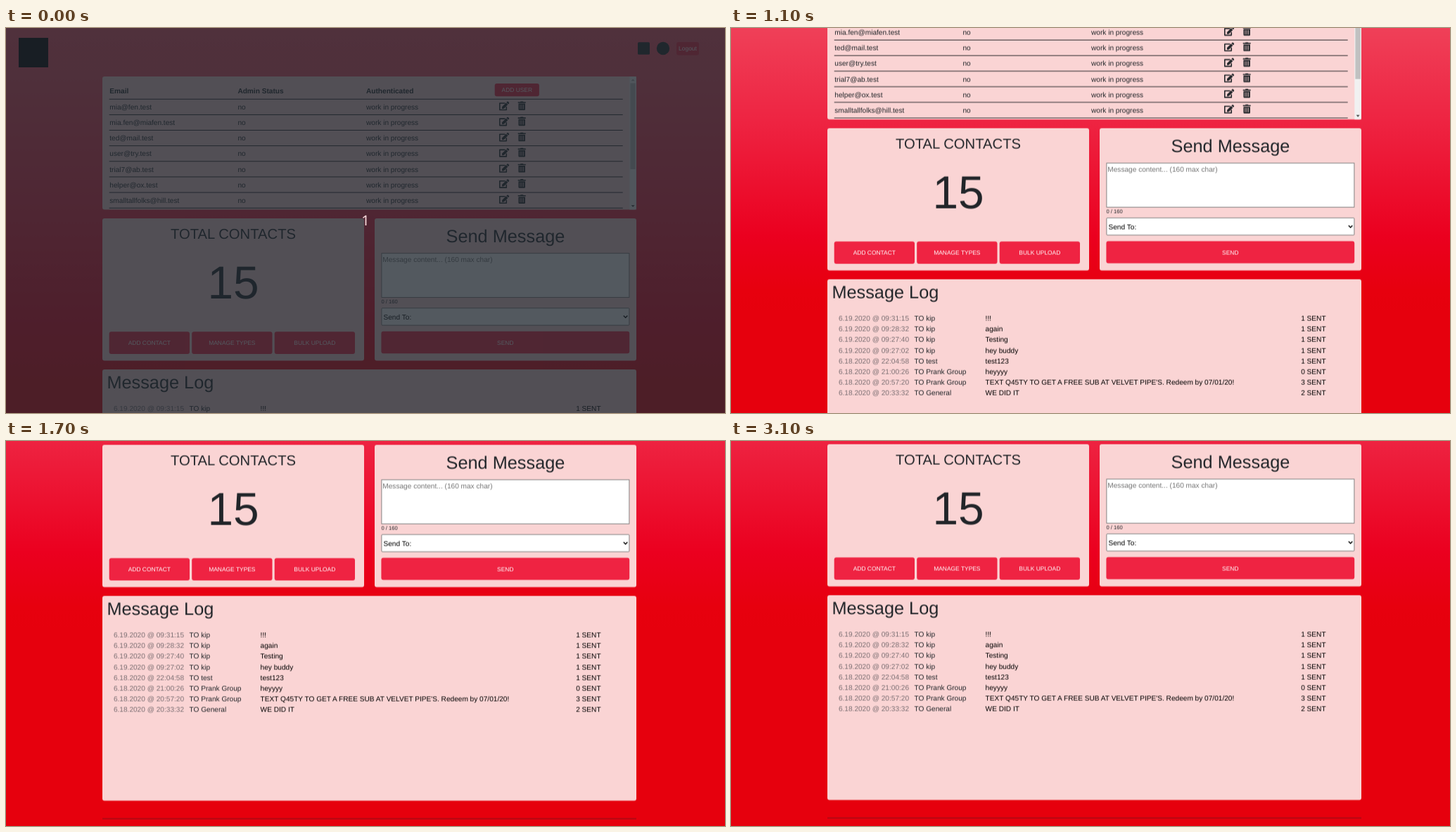
These frames come from a looping animation (1022 by 548 pixels, 3.8 s). An HTML page:

```html
<!DOCTYPE html>
<html lang="en">
<head>
<meta charset="utf-8">
<title>Message dashboard</title>
<style>
  html, body { margin: 0; width: 100%; height: 100%; overflow: hidden; background: #e6000d; }
  svg { display: block; width: 100vw; height: 100vh; }
  text {
    font: 10.12px "Liberation Sans", Arial, sans-serif;
    fill: #212529;
    text-rendering: geometricPrecision;
    white-space: pre;
  }
  .bold { font-weight: 700; }
  .mid { text-anchor: middle; }
  .h1 { font-size: 25.3px; }
  .h2 { font-size: 20.24px; }
  .total { font-size: 65.8px; }
  .label { font-size: 8.43px; fill: #fff; text-anchor: middle; }
  .small { font-size: 7.6px; }
  .hint { fill: #757575; }
  .date { fill: #7a6e72; }
  .black { fill: #000; }
  .card { fill: #fad4d4; }
  .btn { fill: #ef2342; }
  .ink { fill: #212529; }
  .field { fill: #fff; stroke: #767676; stroke-width: .9; }
  .rule { fill: #17191c; }
  .count { font: 20px "Noto Sans", sans-serif; fill: #fbdcde; text-anchor: middle; }

  #page { animation: scroll 3800ms step-end infinite; }
  #shade { animation: lift 3800ms step-end infinite; }

  /* four wheel notches, sampled ten times a second */
  @keyframes scroll {
    0% { transform: translateY(0); }
    15.789% { transform: translateY(-20px); }
    18.421% { transform: translateY(-57px); }
    21.052% { transform: translateY(-66.5px); }
    26.315% { transform: translateY(-94px); }
    28.947% { transform: translateY(-128.4px); }
    31.578% { transform: translateY(-133px); }
    36.842% { transform: translateY(-152px); }
    39.473% { transform: translateY(-186.5px); }
    42.105% { transform: translateY(-243px); }
    44.736% { transform: translateY(-265.5px); }
    52.631%, 100% { transform: translateY(-266.5px); }
  }
  @keyframes lift {
    0% { opacity: 1; }
    13.157%, 100% { opacity: 0; }
  }
</style>
</head>
<body>
<svg viewBox="0 0 1022 548">
  <defs>
    <linearGradient id="sky" gradientUnits="userSpaceOnUse" x1="0" y1="0" x2="0" y2="560">
      <stop offset="0" stop-color="#f15267"/>
      <stop offset=".12" stop-color="#f04d63"/>
      <stop offset=".475" stop-color="#ee2341"/>
      <stop offset=".76" stop-color="#eb001f"/>
      <stop offset=".9" stop-color="#e7000e"/>
      <stop offset="1" stop-color="#e6000d"/>
    </linearGradient>
    <g id="edit" transform="scale(.0247)">
      <path d="M318 96H32V480H416V322" fill="none" stroke="#212529" stroke-width="64" stroke-linejoin="round" stroke-linecap="round"/>
      <path class="ink" d="M396 76L500 180L274 406L160 416L170 302Z"/>
      <path class="ink" d="M420 54L461 11Q488-10 516 11L565 60Q586 88 565 116L522 156Z"/>
    </g>
    <g id="trash" transform="scale(.0247)">
      <path class="ink" d="M32 128H416V464a48 48 0 0 1-48 48H80a48 48 0 0 1-48-48Z"/>
      <path class="ink" d="M10 32H136L152 0H296L312 32H438Q448 32 448 42V96H0V42Q0 32 10 32Z"/>
      <path d="M128 208V432M224 208V432M320 208V432" stroke="#fad4d4" stroke-width="32" stroke-linecap="round"/>
    </g>
  </defs>
  <g id="page"></g>
  <g id="shade">
    <rect width="1022" height="548" fill="rgb(32,40,48)" fill-opacity=".77"/>
    <text class="count" x="511" y="281">1</text>
  </g>
</svg>
<script>
  const rect = (cls, x, y, w, h, r = 0) =>
    `<rect class="${cls}" x="${x}" y="${y}" width="${w}" height="${h}" rx="${r}"/>`;
  const text = (cls, x, y, str) => `<text class="${cls}" x="${x}" y="${y}">${str}</text>`;
  const icon = (id, x, y) => `<use href="#${id}" x="0" y="0" transform="translate(${x} ${y})"/>`;
  const button = (x, y, w, h, str) =>
    rect('btn', x, y, w, h, 3) + text('label', x + w / 2, y + h / 2 + 3.1, str);

  function header() {
    return rect('black', 18, 14, 42, 42) +
      rect('ink', 898, 20.3, 17, 17.4, 1.5) +
      '<circle class="ink" cx="934" cy="29" r="9.2"/>' +
      button(953, 20, 32, 18.7, 'Logout');
  }

  function users() {
    const mails = ['mia@fen.test', 'mia.fen@miafen.test', 'ted@mail.test', 'user@try.test',
      'trial7@ab.test', 'helper@ox.test', 'smalltallfolks@hill.test'];
    const rowH = 22.14;
    let out = rect('card', 137, 69, 759, 189.5, 3) +
      text('bold', 147.3, 93, 'Email') +
      text('bold', 329.4, 93, 'Admin Status') +
      text('bold', 512, 93, 'Authenticated') +
      button(694.7, 79, 63.2, 18.3, 'ADD USER') +
      rect('rule', 146.7, 100.8, 730, .9);
    mails.forEach((mail, i) => {
      const y = 116 + i * rowH;
      out += text('', 147.3, y, mail) +
        text('', 329.4, y, 'no') +
        text('', 512, y, 'work in progress') +
        icon('edit', 701, y - 11.4) +
        icon('trash', 727.7, y - 11.6) +
        rect('rule', 146.7, 100.8 + (i + 1) * rowH, 730, .9);
    });
    return out +
      '<rect x="886.3" y="69" width="9.5" height="189.5" fill="#f1f1f1"/>' +
      '<rect x="887.4" y="78.5" width="7.3" height="122.5" fill="#c1c1c1"/>' +
      '<path d="M888.6 75.3h5l-2.5-2.6z" fill="#a3a3a3"/>' +
      '<path d="M888.6 252.2h5l-2.5 2.6z" fill="#333"/>';
  }

  function contacts() {
    return rect('card', 137, 271, 372, 202.5, 3) +
      text('h2 mid', 323, 300, 'TOTAL CONTACTS') +
      text('total mid', 323, 384.5, '15') +
      ['ADD CONTACT', 'MANAGE TYPES', 'BULK UPLOAD']
        .map((s, i) => button(146.7 + i * 117.5, 432.3, 114.3, 31.6, s)).join('');
  }

  function composer() {
    return rect('card', 524, 271, 372, 202.5, 3) +
      text('h1 mid', 710, 304.8, 'Send Message') +
      rect('field', 533.9, 320.7, 352, 62.7) +
      text('hint', 535.3, 333.4, 'Message content... (160 max char)') +
      text('small', 533.5, 392.1, '0 / 160') +
      rect('field', 533.9, 398.7, 352, 24.4, 1) +
      text('black', 536.5, 414.5, 'Send To:') +
      '<path d="M877.8 409.5l2.8 2.8 2.8-2.8" fill="none" stroke="#000" stroke-width="1.4"/>' +
      button(533.4, 431.7, 352.8, 31.6, 'SEND');
  }

  function log() {
    const lines = [
      '6.19.2020 @ 09:31:15|kip|!!!|1',
      '6.19.2020 @ 09:28:32|kip|again|1',
      '6.19.2020 @ 09:27:40|kip|Testing|1',
      '6.19.2020 @ 09:27:02|kip|hey buddy|1',
      '6.18.2020 @ 22:04:58|test|test123|1',
      '6.18.2020 @ 21:00:26|Prank Group|heyyyy|0',
      "6.18.2020 @ 20:57:20|Prank Group|TEXT Q45TY TO GET A FREE SUB AT VELVET PIPE'S. Redeem by 07/01/20!|3",
      '6.18.2020 @ 20:33:32|General|WE DID IT|2'
    ];
    return rect('card', 137, 486, 759, 291.5, 3) +
      text('h1', 143.4, 513.4, 'Message Log') +
      lines.map((line, i) => {
        const [date, to, msg, sent] = line.split('|');
        const y = 545 + i * 15.18;
        return text('date', 152.9, y, date) + text('', 260.5, y, 'TO ' + to) +
          text('black', 361.6, y, msg) + text('black', 810.2, y, sent + ' SENT');
      }).join('') +
      '<rect x="137" y="802.6" width="759" height="1" fill="rgba(33,37,41,.5)"/>';
  }

  document.getElementById('page').innerHTML =
    '<rect width="1022" height="820" fill="url(#sky)"/>' +
    header() + users() + contacts() + composer() + log();
</script>
</body>
</html>
```
